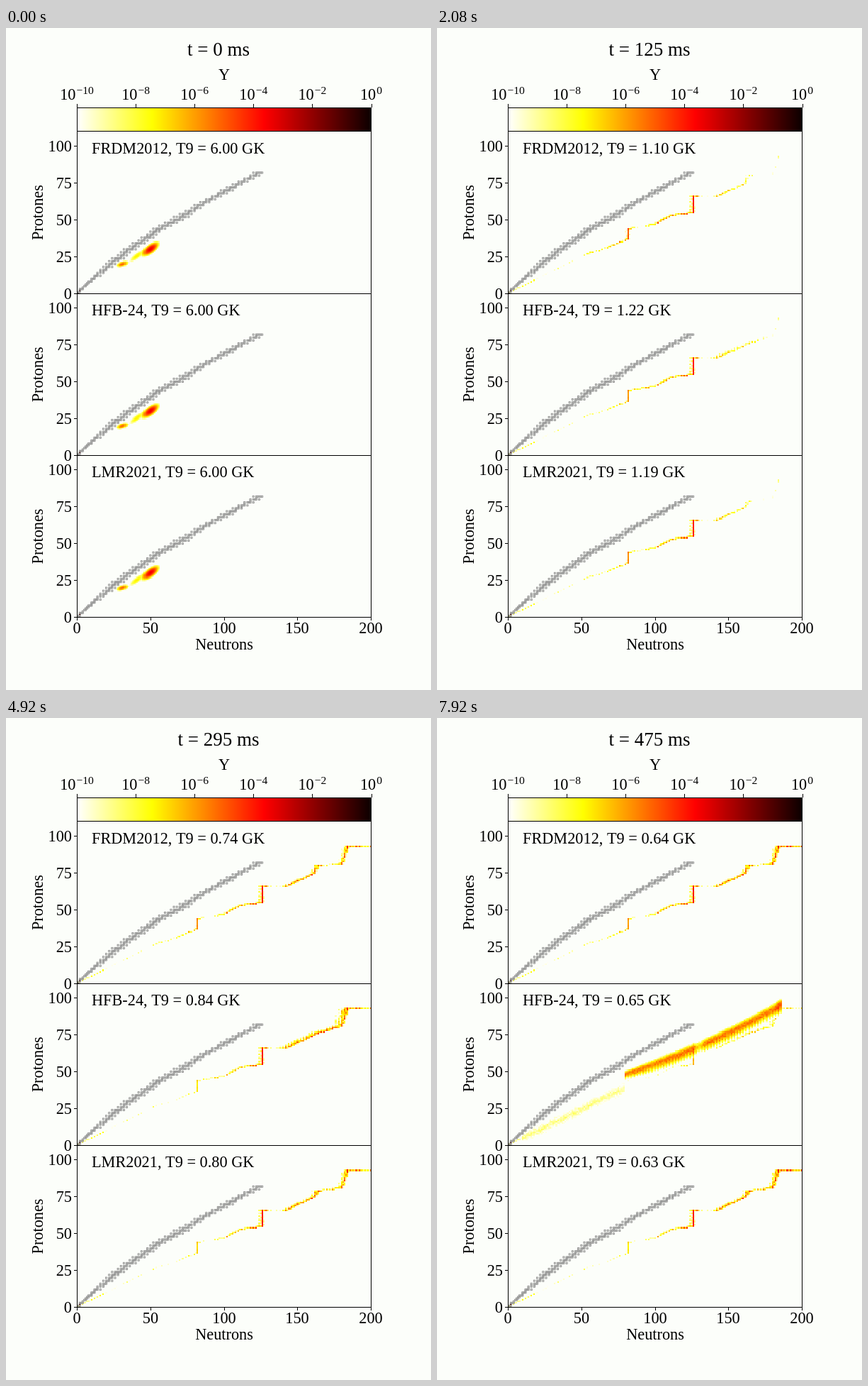
These frames come from a looping animation (600x933 px, 8000 ms). An HTML page with a canvas:

```html
<!DOCTYPE html>
<html lang="en">
<head>
<meta charset="utf-8">
<title>Nuclear abundances</title>
<style>
  html, body { margin: 0; width: 100%; height: 100%; overflow: hidden; background: #fcfefa; }
  canvas { display: block; }
</style>
</head>
<body>
<canvas id="stage" width="600" height="933"></canvas>
<script>
const ctx = document.getElementById('stage').getContext('2d');
const LEFT = 100, RIGHT = 515.5, TOP = 146, PANEL = 228.2, UNIT = 2.0765;
const LOOP = 8000, FONT = '"Liberation Serif", serif', SIZE = 22.3;
const BACKGROUND = '#fcfefa';

const clamp = (v, lo = 0, hi = 1) => Math.min(hi, Math.max(lo, v));
const bell = (x, width) => Math.exp(-((x / width) ** 2));

function interp(points, x) {
  const i = clamp(points.findIndex(p => p[0] >= x), 1, points.length - 1);
  const [x0, y0] = points[i - 1], [x1, y1] = points[i];
  return y0 + (y1 - y0) * clamp((x - x0) / (x1 - x0));
}

function hash(a, b) {
  const v = Math.sin(a * 127.1 + b * 311.7) * 43758.5453;
  return v - Math.floor(v);
}

// Black-red-yellow-white scale, reversed; v runs from 0 (white) to 1 (black).
function heat(v) {
  const u = 1 - clamp(v);
  const parts = [0.042 + u / 0.381, (u - 0.365) / 0.381, (u - 0.746) / 0.254];
  return `rgb(${parts.map(p => Math.round(255 * clamp(p))).join()})`;
}

// kink: Z reached at N = 163; drain: decades lost by light nuclei;
// spread: decades per neutron beside the path; gap: thinning after minor shells.
const TIMES = [0, 80, 125, 185, 295, 380, 475];
const models = [
  { name: 'FRDM2012', kink: 80, drain: 3.6, spread: 1.8, gap: 2.5,
    T9: [6, 1.41, 1.10, 0.92, 0.74, 0.67, 0.64] },
  { name: 'HFB-24', kink: 76, drain: 6, spread: 0.8, gap: 0, freezesOut: true,
    T9: [6, 1.49, 1.22, 1.05, 0.84, 0.73, 0.65] },
  { name: 'LMR2021', kink: 79, drain: 5.5, spread: 1.5, gap: 1.5,
    T9: [6, 1.48, 1.19, 1.03, 0.80, 0.69, 0.63] }
];

const SHELLS = [82, 126, 184], THIN_AFTER = [82, 126, 163];

// Cells along the reaction path, each with a fixed offset from the path level.
function pathCells({ kink, spread, gap }) {
  const points = [[0, 0], [54, 27], [62, 29], [82, 37], [82, 44], [100, 47], [111, 53], [126, 55],
    [126, 66], [142, 66], [162, 75], [163, kink], [180, 81], [184, 93], [200, 93]];
  const cells = new Map();

  function add(N, Z, from) {
    const thin = THIN_AFTER.find(shell => from > shell + 3 && from < shell + 15);
    const side = N > from ? 3 : from > 140 ? spread : 2.3;
    const noise = SHELLS.includes(N) ? 0.8 : 2.8;
    const offset = 0.7 - noise * hash(N, Z) - side * Math.abs(N - from) - (N % 2 ? 1.7 : 0)
      - (thin === 126 ? 4 : thin ? gap : 0) + (from < 20 ? 1 : 0);
    const key = N * 200 + Z, old = cells.get(key);
    if (!old || old.offset < offset) cells.set(key, { N, Z, from, offset });
  }

  for (let i = 1; i < points.length; i++) {
    const [n0, z0] = points[i - 1], [n1, z1] = points[i];
    const steps = Math.max(n1 - n0, Math.abs(z1 - z0));
    for (let s = 0; s <= steps; s++) {
      const from = Math.round(n0 + (n1 - n0) * s / steps);
      const Z = Math.round(z0 + (z1 - z0) * s / steps);
      for (let N = Math.max(0, from - 6); N <= from + 1; N++) add(N, Z, from);
    }
  }
  return [...cells.values()];
}
for (const m of models) m.cells = pathCells(m);

const freezeOut = (model, t) => model.freezesOut ? clamp((t - 430) / 45) : 0;

// log10 abundance: a front moves up the path while lighter nuclei drain away.
function pathLevel(model, N, t) {
  const arrival = 10 + 2.2e-5 * N ** 3;
  const build = 4 * Math.exp(-2 * (t - arrival) / arrival);
  if (N < 54) return -8.7 - build;
  const shell = Math.max(...SHELLS.map(s => bell(N - s, 3)));
  const drained = model.drain * (1 - Math.exp(-t / 150)) * clamp((130 - N) / 70);
  return Math.max(-8.8, -4.6 + 0.8 * shell - drained) - build - 2.5 * freezeOut(model, t);
}

// Initial equilibrium clouds: centre, slope angle, peak and squared widths.
const clouds = [
  { N: 50, Z: 30.2, angle: 0.64, peak: -3.4, along: 10.5, across: 1.8 },
  { N: 41, Z: 25.5, angle: 0.64, peak: -7.2, along: 16, across: 1.4 },
  { N: 31, Z: 20, angle: 0.31, peak: -5.1, along: 4.2, across: 0.8 }
];

function cloudLevel(N, Z, t) {
  return Math.max(...clouds.map(c => {
    const dN = N - c.N - t * 0.25, dZ = Z - c.Z - t * 0.03;
    const cos = Math.cos(c.angle), sin = Math.sin(c.angle);
    const a = dN * cos + dZ * sin, b = dZ * cos - dN * sin;
    return c.peak - a * a / c.along - b * b / c.across - t * 0.2;
  }));
}

// Wide band left by the freeze-out, with a pale one among the light nuclei.
function bandLevel(N, Z, freeze) {
  const fade = 7 * (1 - freeze) + hash(N, Z);
  if (N < 80) return -8.2 - Math.abs(Z - 0.49 * N) / 2.5 - fade;
  const x = N - 82, d = Z - (49 + 0.31 * x + 0.0013 * x * x);
  const width = clamp(1.5 + 0.1 * x, 1.5, 4);
  const fall = d > 0 ? d * d / width : -0.2 * d + d * d / (2.5 * width);
  const uneven = N % 2 && d < 0 ? -0.35 * d : 0;
  const thin = 1.5 * bell(N - 130, 3), shell = bell(N - 126, 1) + bell(N - 184, 2);
  return -4.9 - fall - uneven - thin + shell - fade;
}

// Stable nuclides scatter around the valley of stability.
const VALLEY = [[0, 0], [8, 9], [20, 23], [28, 33], [38, 48], [44, 56], [50, 68], [62, 87], [70, 102], [82, 124]];

function isStable(N, Z) {
  const off = Math.abs(N - interp(VALLEY, Z));
  const half = Math.min(4, Z / 5) + 2 * bell(Z - 52, 3);
  if (Z % 2) return N % 2 === 0 ? off <= (Z % 4 === 1 ? 1 : 1.4) : Z < 9 && N === Z;
  return off <= (N % 2 ? half / 3 : half);
}

const stable = [];
for (let Z = 1; Z <= 82; Z++)
  for (let N = 0; N <= 126; N++) if (isStable(N, Z)) stable.push([N, Z]);

const xOf = N => LEFT + N * UNIT;

function drawCell(N, Z, base, level) {
  if (level <= -9.9) return;
  const x = Math.round(xOf(N - 0.5)), y = Math.round(base - (Z + 0.5) * UNIT);
  ctx.fillStyle = heat((level + 10) / 10);
  ctx.fillRect(x, y, Math.round(xOf(N + 0.5)) - x, Math.round(base - (Z - 0.5) * UNIT) - y);
}

function drawField(base, [n0, n1], [z0, z1], level) {
  for (let N = n0; N <= n1; N++)
    for (let Z = z0; Z <= z1; Z++) drawCell(N, Z, base, level(N, Z));
}

function text(str, x, y, align = 'center', size = SIZE) {
  ctx.font = `${size}px ${FONT}`;
  ctx.textAlign = align;
  ctx.fillStyle = '#000';
  ctx.fillText(str, x, y);
}

function line(x0, y0, x1, y1) {
  ctx.beginPath();
  ctx.moveTo(x0, y0);
  ctx.lineTo(x1, y1);
  ctx.stroke();
}

function drawColorbar() {
  for (let x = LEFT; x < RIGHT; x++) {
    ctx.fillStyle = heat((x - LEFT) / (RIGHT - LEFT));
    ctx.fillRect(x, 112, 1, 34);
  }
  ctx.strokeStyle = '#000';
  ctx.lineWidth = 1;
  ctx.strokeRect(100.5, 112.5, 415, 33);
  text('Y', 308, 73);
  for (let i = 0; i <= 5; i++) {
    const x = LEFT + i * 83.1, power = i < 5 ? '\u2212' + (10 - 2 * i) : '0';
    line(Math.round(x) + 0.5, 107, Math.round(x) + 0.5, 112);
    ctx.font = `15.6px ${FONT}`;
    const start = x - (SIZE + 1 + ctx.measureText(power).width) / 2;
    text('10', start, 101, 'left');
    text(power, start + SIZE + 1, 93, 'left', 15.6);
  }
}

function temperature(model, t) {
  const log = s => Math.log(s + 6.4);
  return Math.exp(interp(TIMES.map((s, i) => [log(s), Math.log(model.T9[i])]), log(t)));
}

function drawPanel(model, index, t) {
  const top = TOP + index * PANEL, base = top + PANEL, freeze = freezeOut(model, t);
  ctx.save();
  ctx.beginPath();
  ctx.rect(LEFT, top, RIGHT - LEFT, PANEL);
  ctx.clip();
  for (const c of model.cells) drawCell(c.N, c.Z, base, pathLevel(model, c.from, t) + c.offset);
  if (t < 40) drawField(base, [24, 72], [15, 42], (N, Z) => cloudLevel(N, Z, t));
  if (freeze) drawField(base, [10, 186], [4, 100], (N, Z) => bandLevel(N, Z, freeze));
  drawCell(1, 0, base, -0.3);
  drawCell(2, 2, base, -1.5);
  ctx.strokeStyle = '#808080';
  ctx.lineWidth = 0.8;
  for (const [N, Z] of stable)
    ctx.strokeRect(xOf(N - 0.5), base - (Z + 0.5) * UNIT, UNIT, UNIT);
  ctx.restore();

  ctx.strokeStyle = '#000';
  ctx.lineWidth = 1;
  const bottom = Math.floor(base) + 0.5;
  line(100, bottom, 516, bottom);
  line(100.5, top - 1, 100.5, bottom);
  line(515.5, top - 1, 515.5, bottom);
  for (let Z = 0; Z <= 100; Z += 25) {
    const y = Math.floor(base - Z * UNIT);
    line(96, y + 0.5, 100, y + 0.5);
    text(Z, 93, y + 8, 'right');
  }
  text(`${model.name}, T9 = ${temperature(model, t).toFixed(2)} GK`, 121, Math.round(top + 31), 'left');
  ctx.save();
  ctx.translate(52, top + PANEL / 2);
  ctx.rotate(-Math.PI / 2);
  text('Protones', 0, 0);
  ctx.restore();
}

function draw(t) {
  ctx.fillStyle = BACKGROUND;
  ctx.fillRect(0, 0, 600, 933);
  text(`t = ${t} ms`, 300, 39, 'center', 27);
  drawColorbar();
  models.forEach((m, i) => drawPanel(m, i, t));
  for (let N = 0; N <= 200; N += 50) {
    const x = Math.round(xOf(N));
    line(x + 0.5, 831, x + 0.5, 835);
    text(N, x, 853);
  }
  text('Neutrons', 308, 876);
}

// Twelve pictures a second, with starts on whole 10 ms ticks; each advances 5 ms.
let shown = -1;
function tick() {
  const ticks = Math.floor(performance.now() % LOOP / 10);
  const step = Math.floor((ticks + 0.5) * 0.12);
  if (step !== shown) draw(5 * (shown = step));
  requestAnimationFrame(tick);
}
tick();
</script>
</body>
</html>
```
